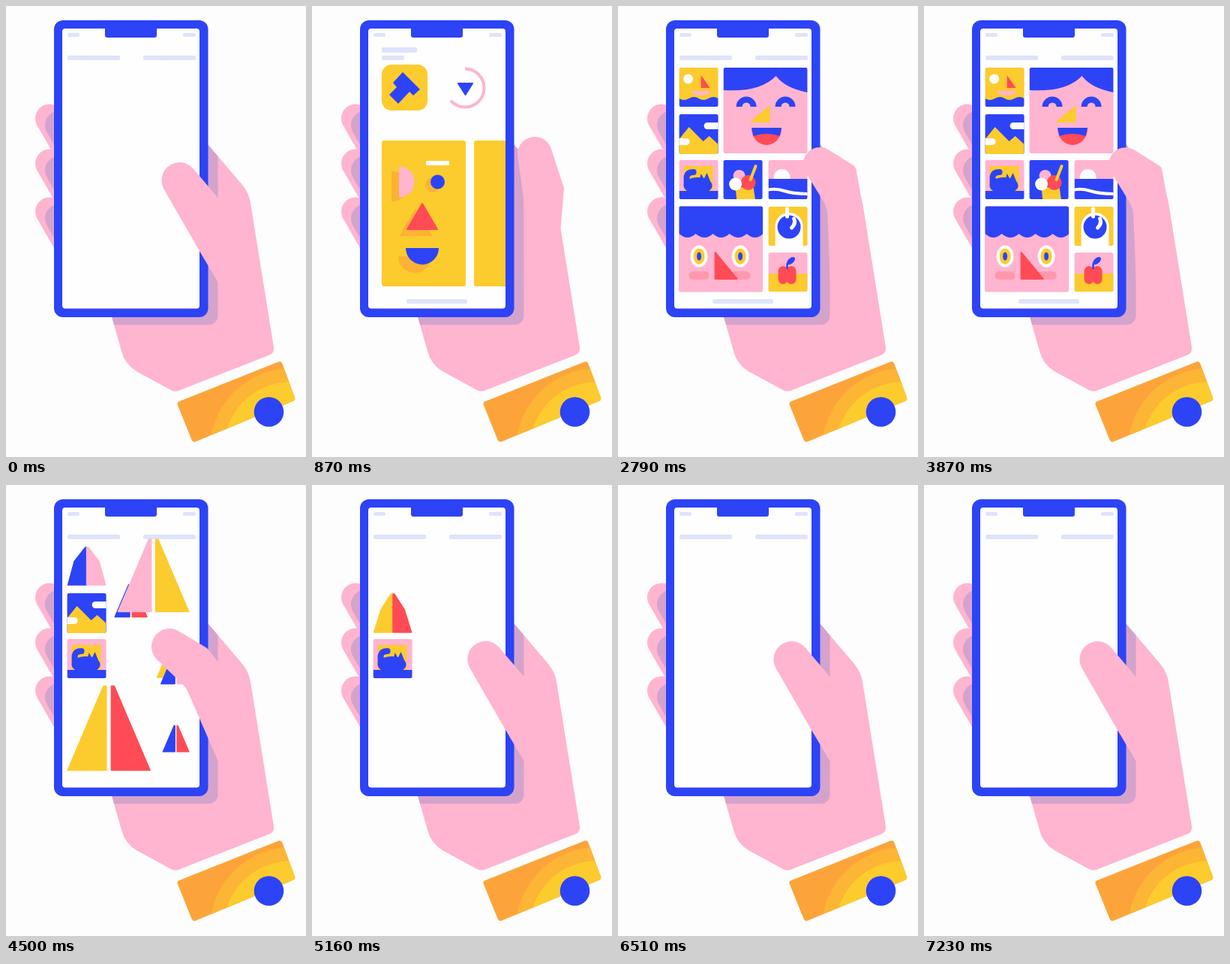
Recreate the animation shown at these times as an HTML page with a canvas. Size 400 by 600 pixels, loop 7.26 s.

```html
<!DOCTYPE html>
<html lang="en">
<head>
<meta charset="utf-8">
<title>Phone in hand</title>
<style>
html, body { margin: 0; width: 100%; height: 100%; overflow: hidden; background: #fdfdfd; }
canvas { display: block; width: 400px; height: 600px; }
</style>
</head>
<body>
<canvas id="stage" width="400" height="600"></canvas>
<script>
const ctx = document.getElementById('stage').getContext('2d');
const LOOP = 7260;
const BG = '#fdfdfd', BLUE = '#2d43f6', PINK = '#ffb4d0', YELLOW = '#fccb2e', RED = '#ff4b55',
  WHITE = '#fefefe', SHADE = '#d4a3cb', BAR = '#dfe3fb', AMBER = '#fcb233';

const clamp = v => Math.max(0, Math.min(1, v));
const span = (t, from, len) => clamp((t - from) / len);
const mix = (a, b, k) => a + (b - a) * k;
const smooth = k => k * k * (3 - 2 * k);
const outCubic = k => 1 - (1 - k) ** 3;
const outBack = k => 1 + 2.70158 * (k - 1) ** 3 + 1.70158 * (k - 1) ** 2;

// Shape helpers
function fill(color, path) {
  ctx.fillStyle = color;
  path ? ctx.fill(path) : ctx.fill();
}
function box(color, x, y, w, h, r = 0) {
  ctx.beginPath();
  ctx.roundRect(x, y, w, h, r);
  fill(color);
}
function disc(color, x, y, rx, ry = rx, turn = 0) {
  ctx.beginPath();
  ctx.ellipse(x, y, rx, ry, turn, 0, Math.PI * 2);
  fill(color);
}
function half(color, x, y, r, from, ry = r) {
  ctx.beginPath();
  ctx.ellipse(x, y, r, ry, 0, from, from + Math.PI);
  fill(color);
}
function poly(color, pts, round = 0) {
  ctx.beginPath();
  pts.forEach(p => ctx.lineTo(p[0], p[1]));
  ctx.closePath();
  fill(color);
  if (!round) return;
  ctx.strokeStyle = color;
  ctx.lineWidth = round;
  ctx.lineJoin = 'round';
  ctx.stroke();
}
function shape(color, d) { fill(color, new Path2D(d)); }
function line(color, width, d, cap = 'round') {
  ctx.strokeStyle = color;
  ctx.lineWidth = width;
  ctx.lineCap = cap;
  ctx.stroke(new Path2D(d));
}
function layer(draw) {
  ctx.save();
  draw();
  ctx.restore();
}
function pop(x, y, k, draw) {
  if (k <= 0) return;
  layer(() => {
    const s = outBack(k);
    ctx.translate(x, y);
    ctx.scale(s, s);
    ctx.translate(-x, -y);
    draw();
  });
}

// Tile pictures; rise is the distance still to travel into place
function sunset() {
  disc(WHITE, 94, 97, 6.5);
  poly(RED, [[111, 92], [123, 109], [111, 109]]);
  half(PINK, 111, 113, 13, 0, 6);
  shape(BLUE, 'M82 123q6 4 13 0t13 0 13 0 13 0V190H82z');
}
function peaks(rise) {
  poly(YELLOW, [[82, 177], [95, 161], [114, 180], [122, 173], [134, 184], [134, 240], [82, 240]]);
  box(WHITE, 115 + rise, 155 - rise, 26, 9, 4.5);
  box(WHITE, 74 - rise, 176 - rise, 22, 9, 4.5);
}
function pet(rise) {
  box(YELLOW, 88, 213, 39, 34);
  ctx.translate(0, rise);
  disc(BLUE, 107, 239, 19, 11);
  line(BLUE, 8, 'M92 238V227q1-6 9-6');
  poly(BLUE, [[108, 235], [111, 223], [115, 230], [119, 222], [125, 237]]);
  box(BLUE, 82, 246, 52, 60);
}
function sundae() {
  poly(YELLOW, [[157, 241], [181, 241], [184, 262], [159, 262]]);
  disc(PINK, 162, 226, 8);
  disc(RED, 174, 235, 10);
  disc(WHITE, 157, 237, 8.5);
  line(YELLOW, 4, 'M177 231L184 213');
}
function sea() {
  disc(WHITE, 219, 228, 11);
  box(BLUE, 201, 230, 52, 60);
  line(WHITE, 4, 'M198 245q12-3 24 1t34 4', 'butt');
}
function jar() {
  box(WHITE, 210, 275, 37, 70, [18, 18, 0, 0]);
  disc(BLUE, 228.5, 294, 15.5);
  line(WHITE, 5, 'M226 270V280M235 283Q238 289 232 295');
}
function apple() {
  box(YELLOW, 201, 356, 52, 70);
  box(RED, 214, 346, 13, 24, 6.5);
  box(RED, 225, 346, 13, 24, 6.5);
  line(BLUE, 2.5, 'M226 349V343');
  disc(BLUE, 231, 339, 6.5, 3.6, -0.7);
}
function laugh(rise) {
  layer(() => {
    ctx.translate(0, -rise);
    shape(BLUE, 'M141 40H253V115Q223 109 211 93Q190 115 141 112z');
  });
  ctx.translate(0, rise);
  line(BLUE, 8, 'M162 134a9.5 9.5 0 0 1 19 0M214 134a9.5 9.5 0 0 1 19 0', 'butt');
  poly(YELLOW, [[203, 132], [203, 155], [175, 155]]);
  half(RED, 198.5, 163, 20, 0, 22);
  shape(BLUE, 'M178.5 162H218.5L216 173Q198 167 181 173z');
}
function stare(rise) {
  layer(() => {
    ctx.translate(0, -rise);
    shape(BLUE, 'M82 220H194V303q-11 10-22 0-11 10-23 0-11 10-22 0-11 10-23 0-11 10-22 0z');
  });
  ctx.translate(0, rise);
  for (const x of [108.5, 163.5]) {
    disc(WHITE, x, 333, 11.5, 14.5);
    disc(YELLOW, x, 333, 7.5, 10.5);
    disc(BLUE, x, 333, 3, 5.5);
  }
  box('#ff98ac', 95, 353, 27, 11, 5.5);
  box('#ff98ac', 150, 353, 27, 11, 5.5);
  poly(RED, [[130, 328], [159, 363], [130, 363]], 2);
}

// enter, fill: arrival times; leave: take-off time; size: scale in flight
const tile = (x, y, w, h, color, art, enter, fill, drop, wings, leave, size) =>
  ({ x, y, w, h, color, art, enter, fill, drop, wings, leave, size });
const tiles = [
  tile(82, 82, 52, 52, YELLOW, sunset, 1800, 2260, 0, [BLUE, PINK], 4655, 1),
  tile(82, 144, 52, 53, BLUE, peaks, 1940, 2190, 0, [YELLOW, RED], 5300, 1.1),
  tile(82, 205, 52, 52, PINK, pet, 2088, 2190, 19, [BLUE, PINK], 5884, 1.1),
  tile(141, 205, 52, 52, BLUE, sundae, 2101, 2260, 0, [BLUE, RED], 4322, 0.86),
  tile(201, 205, 52, 52, PINK, sea, 2230, 2330, 0, [YELLOW, PINK], 4510, 1),
  tile(201, 267, 52, 52, YELLOW, jar, 2080, 2260, 0, [BLUE, PINK], 4359, 0.8),
  tile(201, 328, 52, 52, PINK, apple, 2230, 2330, 0, [BLUE, RED], 4418, 0.7),
  tile(81.5, 266.5, 112, 114, PINK, stare, 2143, 2300, 0, [YELLOW, RED], 4560, 1),
  tile(141, 82, 112, 114, PINK, laugh, 2088, 2260, 46, [PINK, YELLOW], 4413, 0.86)
];

function drawPlane(p, fold) {
  const { x, w } = p, top = p.y + 1, base = p.y + p.h - 1;
  const gap = (0.5 + 0.025 * w) * smooth(span(fold, 0.75, 0.25));
  const c = x + w / 2;
  for (const side of [-1, 1]) {
    const edge = c + side * (w / 2 - 1), mid = c + side * gap, tip = mid + side * w * 0.035;
    poly(p.wings[(side + 1) / 2], [
      [mid, top], [tip, top],
      [mix(edge, (edge + tip) / 2, fold), mix(top, (top + base) / 2, fold)],
      [edge, base], [mid, base]
    ], 1.5);
  }
}

function drawTile(p, t) {
  const k = span(t, p.enter, 350);
  if (k <= 0 || t > p.leave + 700) return;
  const cx = p.x + p.w / 2, cy = p.y + p.h / 2;
  const fly = Math.max(0, t - p.leave);
  const grow = mix(1, p.size, outCubic(clamp(fly / 80)));
  const lift = 600 * (fly / 500) ** 2;
  const fold = smooth(span(t, p.leave - 300, 220));
  layer(() => {
    ctx.translate(cx - 0.4, cy + p.drop * (1 - k) ** 3 - lift);
    ctx.scale(outBack(k) * grow, outBack(clamp(k + 0.02)) * grow);
    ctx.translate(-cx, -cy);
    if (fold > 0) drawPlane(p, fold);
    if (fold >= 0.3) return;
    ctx.globalAlpha = 1 - fold / 0.3;
    box(p.color, p.x, p.y, p.w, p.h, 2.5);
    if (t < p.fill) return;
    ctx.clip();
    const rise = p.h * 0.85 * (1 - outCubic(span(t, p.fill, 300)));
    if (p.w < 100) ctx.translate(0, rise);
    p.art(rise);
  });
}

function drawCard(x) {
  box(YELLOW, x, 179, 112, 194, 3);
}

function drawProfile(t) {
  if (t < 300 || t > 1820) return;
  layer(() => {
    ctx.translate(-200 * smooth(span(t, 1500, 300)), 0);
    pop(110, 63, span(t, 320, 300), () => {
      box(BAR, 93, 55, 47, 7, 2);
      box(BAR, 93, 66, 30, 6, 2);
    });
    pop(123.5, 108.5, span(t, 350, 350), () => {
      box(YELLOW, 93, 78, 61, 61, 13);
      poly(BLUE, [[121, 88], [144, 111], [135, 119], [130, 114], [115, 130], [103, 118], [113, 108], [108, 102]]);
    });
    const ring = span(t, 450, 663);
    if (ring > 0) {
      ctx.beginPath();
      ctx.arc(204, 109, 25.5, -Math.PI / 2, -Math.PI / 2 + ring * Math.PI * 2);
      ctx.strokeStyle = PINK;
      ctx.lineWidth = 4;
      ctx.stroke();
    }
    pop(204, 109, span(t, 420, 300), () => poly(BLUE, [[195, 103], [214, 103], [204.5, 118]], 2));
    layer(() => {
      ctx.translate(0, 230 * (1 - outCubic(span(t, 300, 400))));
      drawCard(93);
      drawCard(216);
    });
    pop(116, 234, span(t, 500, 340), () => {
      half(AMBER, 106, 240, 20.5, -Math.PI / 2);
      half(PINK, 116, 234, 20.5, -Math.PI / 2);
    });
    pop(167, 234, span(t, 520, 340), () => {
      disc(AMBER, 161, 238, 9.5);
      disc(BLUE, 167.5, 234, 9.5);
      box(WHITE, 152, 206, 31, 6, 1);
    });
    pop(147, 285, span(t, 510, 340), () => {
      poly(AMBER, [[138, 271], [118, 305], [159, 305]], 2);
      poly(RED, [[147, 263], [127, 297], [167, 297]], 2);
    });
    pop(147, 330, span(t, 525, 340), () => {
      half(AMBER, 137, 333, 22, 0);
      half(BLUE, 147, 322, 22, 0);
    });
  });
}

function faded(alpha, draw) {
  if (alpha <= 0) return;
  layer(() => {
    ctx.globalAlpha = alpha;
    draw();
  });
}

function drawPhone(t) {
  box(BLUE, 64, 19, 205.5, 395, 12);
  box(WHITE, 75, 30, 183, 372.5, 4);
  layer(() => {
    ctx.clip();
    box(BAR, 82, 36, 16, 5, 2);
    box(BAR, 236, 36, 17, 5, 2);
    faded(1 - span(t, 250, 200) + span(t, 1700, 200), () => {
      box(BAR, 82, 66, 70, 6, 2);
      box(BAR, 183, 66, 70, 6, 2);
    });
    faded(span(t, 400, 200) * (1 - span(t, 4000, 200)), () => box(BAR, 126, 390, 81, 6, 2.5));
    drawProfile(t);
    tiles.forEach(p => drawTile(p, t));
  });
  box(BLUE, 132, 28, 69, 14, [0, 0, 3, 3]);
}

// Hand
const palm = new Path2D('M120 330L140 410 154 459Q158 476 174 486L220 511Q226 514 232 511L352 464Q358 461 357 454' +
  'L326 262Q324 249 315 238L269 184 240 184V330z');

function finger(x, y) {
  const r = 19, a = Math.PI / 6, p = new Path2D();
  p.arc(x, y, r, Math.PI - a, -a);
  p.lineTo(x + r * Math.cos(a) + 40, y - r * Math.sin(a) + 69);
  p.lineTo(x - r * Math.cos(a) + 40, y + r * Math.sin(a) + 69);
  p.closePath();
  return p;
}

function drawBack() {
  for (const y of [149.5, 209.5, 273.5]) {
    const f = finger(58, y);
    fill(PINK, f);
    layer(() => {
      ctx.clip(f);
      fill(SHADE, finger(71, y + 9));
    });
  }
  fill(PINK, palm);
  layer(() => {
    ctx.clip(palm);
    box(SHADE, 77, 29, 205.5, 395, 12);
  });
}

// Thumb pose: tip x, y, radius, outer corner, inner knee
const REST = [231.5, 232, 24, 285, 258, 258, 326];
const OPEN = [297, 197, 23, 336, 242, 282, 255];
const NEAR = [249, 219, 22.5, 284, 221, 263, 284];
const TAP = [269, 210, 22, 317, 214, 279, 268];
const FLICK = [218, 215, 24, 268, 217, 240, 269];
const moves = [[0, REST], [250, REST], [650, OPEN], [1700, OPEN], [2220, NEAR], [2700, TAP], [3850, TAP],
  [4200, REST], [4500, FLICK], [4850, REST], [5150, REST], [5300, FLICK], [5600, REST], [LOOP, REST]];

function thumbAt(t) {
  const i = moves.findIndex(m => m[0] > t);
  const [t0, a] = moves[i - 1], [t1, b] = moves[i];
  const k = smooth((t - t0) / (t1 - t0));
  return a.map((v, n) => mix(v, b[n], k));
}

function drawThumb(t) {
  const [x, y, r, ox, oy, ix, iy] = thumbAt(t);
  const touch = (px, py, side) =>
    Math.atan2(py - y, px - x) + side * Math.acos(Math.min(1, r / Math.hypot(px - x, py - y)));
  const a = touch(ox, oy, -1), b = touch(ix, iy, 1);
  ctx.beginPath();
  ctx.moveTo(331.5, 296);
  ctx.arcTo(ox, oy, x + r * Math.cos(a), y + r * Math.sin(a), 8);
  ctx.arc(x, y, r, a, b, true);
  ctx.arcTo(ix, iy, 283, 368, 40);
  ctx.lineTo(283, 368);
  ctx.lineTo(305, 385);
  ctx.closePath();
  fill(PINK);
}

function drawCuff() {
  const cuff = new Path2D('M228.5 530Q228 527 231 526L363 473.5Q367 472 368.5 476L385 521Q386 524 383 525.5' +
    'L253 579.5Q249 581 247.5 577z');
  layer(() => {
    fill('#fca43a', cuff);
    ctx.clip(cuff);
    disc('#fcb535', 380, 590, 108);
    disc(YELLOW, 380, 590, 90);
  });
  disc(BLUE, 350.5, 540, 19.8);
}

function frame(now) {
  const t = now % LOOP;
  ctx.fillStyle = BG;
  ctx.fillRect(0, 0, 400, 600);
  drawBack();
  drawPhone(t);
  drawThumb(t);
  drawCuff();
  requestAnimationFrame(() => frame(performance.now()));
}
frame(0);
</script>
</body>
</html>
```
